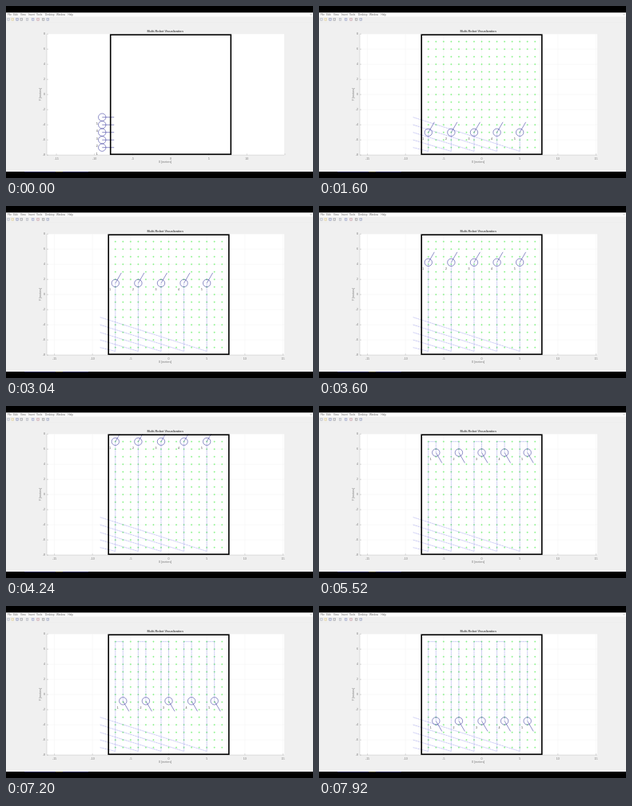
An HTML page that plays this animation: 384x216 px, repeating every 8000 ms.

```html
<!DOCTYPE html>
<html>
<head>
<meta charset="utf-8">
<style>
  html, body { margin: 0; width: 100%; height: 100%; overflow: hidden; background: #000; }
  svg { display: block; width: 100vw; height: 100vh; }
  text { font-family: "Liberation Sans", Arial, sans-serif; font-size: 3.6px; fill: #777; }
  .menu text { font-size: 3.1px; fill: #666; }
  .robot { fill: none; stroke: #34349a; stroke-width: .55; }
  .trail { fill: none; stroke: #6464dc; stroke-width: .45; stroke-dasharray: 1.2 .4; opacity: .8; }
</style>
</head>
<body>
<svg id="stage" viewBox="0 0 384 216" preserveAspectRatio="none"></svg>
<script>
const LOOP = 8000, STEP = 80;
const px = x => 203.5 + 9.53 * x;
const py = y => 111.2 - 9.5 * y;
const stage = document.getElementById('stage');

function add(parent, tag, attrs = {}, text) {
  const el = document.createElementNS('http://www.w3.org/2000/svg', tag);
  set(el, attrs);
  if (text !== undefined) el.textContent = text;
  parent.appendChild(el);
  return el;
}
function set(el, attrs) {
  for (const k in attrs) el.setAttribute(k, attrs[k]);
}
const rect = (p, x, y, width, height, fill) => add(p, 'rect', { x, y, width, height, fill });
const line = (p, x1, y1, x2, y2, stroke, w) =>
  add(p, 'line', { x1, y1, x2, y2, stroke, 'stroke-width': w });
const label = (p, x, y, s, anchor = 'middle', more = {}) =>
  add(p, 'text', { x, y, 'text-anchor': anchor, ...more }, s);

// Piecewise linear lookup in [key, value] pairs
function lerpKeys(keys, t) {
  for (let i = 1; i < keys.length; i++) {
    const [a, u] = keys[i - 1], [b, v] = keys[i];
    if (t <= b) return u + (v - u) * (t - a) / (b - a);
  }
  return keys[keys.length - 1][1];
}

// Window frame
rect(stage, 0, 8.5, 384, 199.5, '#f0f0f0');
rect(stage, 0, 8.5, 384, 4.9, '#fdfdfd');
const menu = add(stage, 'g', { class: 'menu' });
[['File', 2], ['Edit', 9.3], ['View', 18], ['Insert', 28], ['Tools', 38], ['Desktop', 49],
 ['Window', 63], ['Help', 77.5]].forEach(([s, x]) => label(menu, x, 12, s, 'start'));
add(stage, 'path', { d: 'M380.5 10l1 1.3 1-1.3', fill: 'none', stroke: '#888', 'stroke-width': .4 });
const icons = add(stage, 'g', { opacity: .65 });
[['#8a94a8', 1.5], ['#d8b85c', 6.7], ['#44549c', 12.5], ['#66686c', 17.7], ['#8a8fa0', 25],
 ['#5f6fb0', 32.2], ['#b06070', 38.5], ['#666', 45.2], ['#5a6aa0', 50.7]].forEach(([c, x]) => {
  rect(icons, x, 15, 3, 3.4, c);
  rect(icons, x + .6, 15.6, 1.8, 2, '#f0f0f2');
});
line(stage, 0, 20.3, 384, 20.3, '#e6e6e6', .5);
rect(stage, 0, 208, 384, 1, '#0c0c12');
rect(stage, 23, 208, 80, 1, '#1c1c50');
rect(stage, 62, 208, 9, 1, '#403c1c');

// Axes
const AX = { x: 51, y: 35.2, width: 297, height: 152 };
const defs = add(stage, 'defs');
add(add(defs, 'clipPath', { id: 'plot' }), 'rect', AX);
rect(stage, AX.x, AX.y, AX.width, AX.height, '#fff');
const clip = add(stage, 'g', { 'clip-path': 'url(#plot)' });
const grid = add(clip, 'g');
for (let y = -8; y <= 8; y += 2) {
  line(grid, 51, py(y), 348, py(y), '#f3f3f3', .5);
  line(stage, 51, py(y), 53, py(y), '#999', .35);
  label(stage, 49, py(y) + 1.2, y, 'end');
}
line(stage, 51, 35.2, 51, 187.2, '#aaa', .35);
line(stage, 51, 187.2, 348, 187.2, '#aaa', .35);
label(stage, 199.1, 32.9, 'Multi-Robot Visualization', 'middle', { 'font-weight': 'bold', style: 'font-size:3.8px;fill:#505050' });
label(stage, 199, 197.4, 'X [meters]');
label(stage, 0, 0, 'Y [meters]', 'middle', { transform: 'translate(43.8 111) rotate(-90)' });

const ticks = add(stage, 'g');
const xLabels = [];
for (let x = -15; x <= 15; x += 5) {
  line(grid, px(x), 35, px(x), 188, '#f3f3f3', .5);
  line(ticks, px(x), 187.2, px(x), 185.3, '#999', .35);
  xLabels.push(label(ticks, px(x), 192.7, x));
}

// Arena contents
const dots = add(clip, 'g', { stroke: '#66f066', 'stroke-width': .6 });
for (let x = -7; x <= 7; x++)
  for (let y = -7; y <= 7; y++)
    add(dots, 'path', { d: `M${px(x) - 1} ${py(y)}h2m-1-1v2` });
const trails = add(clip, 'g');
const world = add(stage, 'g');
const EDGE = 7.9;
add(world, 'rect', {
  x: px(-EDGE), y: py(EDGE), width: px(EDGE) - px(-EDGE), height: py(-EDGE) - py(EDGE),
  fill: 'none', stroke: '#000', 'stroke-width': 1.6
});
const bots = add(clip, 'g');

const robots = [0, 1, 2, 3, 4].map(i => {
  const x = -7 + 3 * i;
  return {
    path: [[-9, i - 7], [x, -7.5], [x, 7], [x + 1, 7], [x + 1, -7]],
    trail: add(trails, 'polyline', { class: 'trail' }),
    body: add(bots, 'path', { class: 'robot' }),
    tag: label(world, 0, 0, i + 1, 'middle', { style: 'fill:#444' })
  };
});

const progress = [[0, 0], [80, 1], [720, 1], [800, 1.029], [960, 1.029], [1040, 1.057], [1120, 1.086],
  [1280, 1.086], [1360, 1.115], [1440, 1.144], [1520, 1.144], [1600, 1.172], [3040, 1.621],
  [4160, 2], [4960, 2], [5200, 3], [5520, 3.104], [6240, 3.321], [6320, 3.321], [6560, 3.393], [7920, 3.75]];
const heading = [[0, 0], [1, 0], [1.17, 60], [2, 60], [3, 0], [3.1, -60]];

function draw(ms) {
  const t = Math.floor(ms % LOOP / STEP) * STEP;
  const s = lerpKeys(progress, t), started = t >= STEP;
  const a = lerpKeys(heading, s) * Math.PI / 180;
  const leg = Math.min(3, Math.floor(s)), f = s - leg;
  const shift = `translate(${started ? 0 : 2.5} 0)`;
  for (const g of [ticks, world, bots, trails]) set(g, { transform: shift });
  for (const g of [dots, grid, xLabels[6]]) set(g, { visibility: started ? 'visible' : 'hidden' });

  for (const r of robots) {
    const [p, q] = [r.path[leg], r.path[leg + 1]];
    const x = px(p[0] + (q[0] - p[0]) * f), y = py(p[1] + (q[1] - p[1]) * f);
    const past = r.path.slice(0, leg + 1).map(([u, v]) => [px(u), py(v)]);
    set(r.trail, { points: [...past, [x, y]].join(' ') });
    set(r.body, {
      d: `M${x - 4.7} ${y}a4.7 4.7 0 1 0 9.4 0a4.7 4.7 0 1 0 -9.4 0M${x} ${y}l${15 * Math.cos(a)} ${-15 * Math.sin(a)}`
    });
    set(r.tag, { x: x - 6.5, y: y + 9.2 });
  }
}

const start = performance.now();
function tick() {
  draw(performance.now() - start);
  requestAnimationFrame(tick);
}
tick();
</script>
</body>
</html>
```
